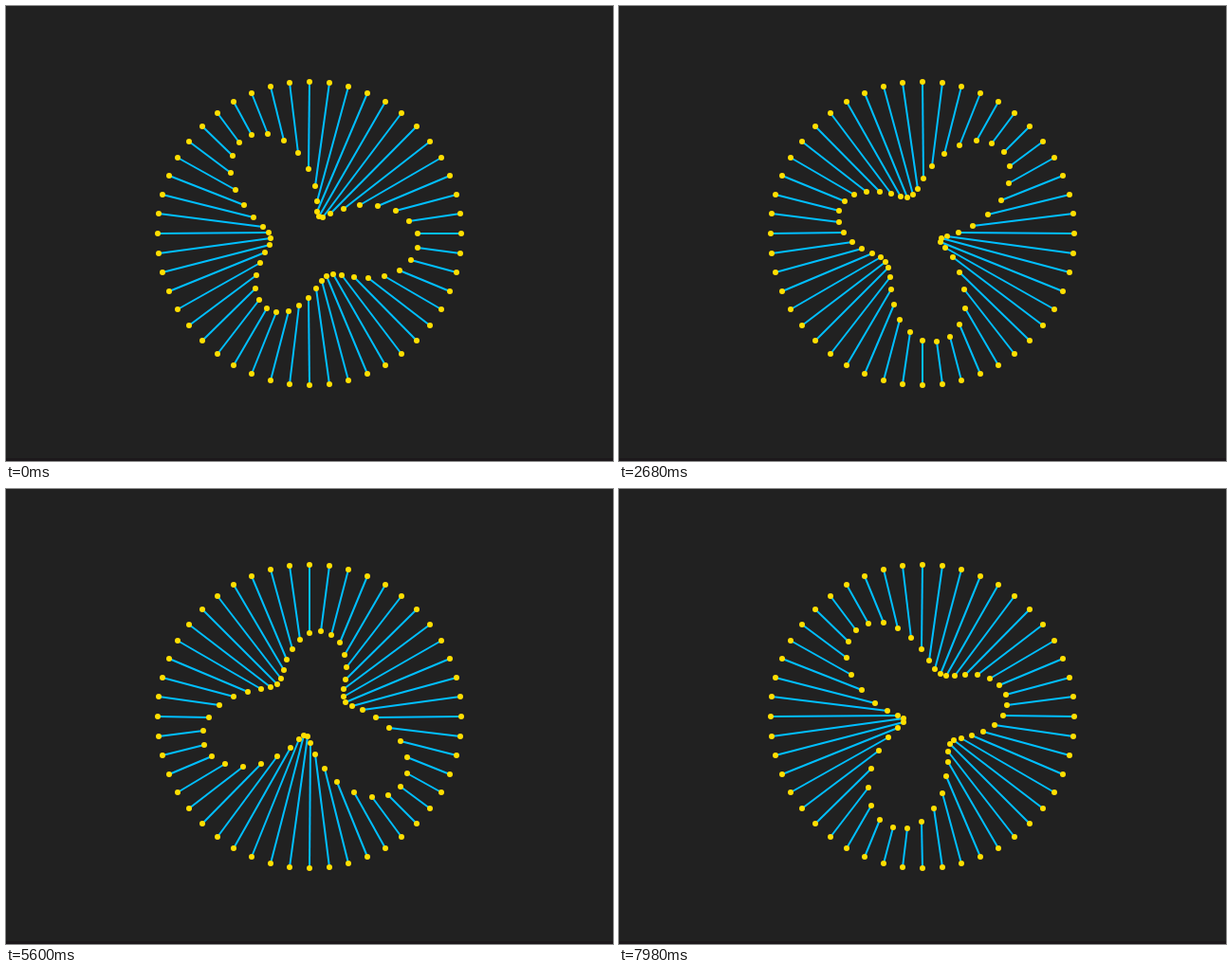
An HTML page with a canvas for the animation above (8000 ms loop, 640 px wide and 480 px high).

```html
<!DOCTYPE html>
<html lang="en">
<head>
<meta charset="utf-8">
<title>Rays on a turning shape</title>
<style>
  html, body { margin: 0; width: 100%; height: 100%; overflow: hidden; background: #212121; }
  canvas { display: block; }
</style>
</head>
<body>
<canvas id="stage" width="640" height="480"></canvas>
<script>
const ctx = document.getElementById('stage').getContext('2d');
const LOOP = 8000, STEP = 20, RAYS = 48;
const CX = 320, CY = 240, RING = 160;
const SPIN = 0.5; // radians per second

// Closed curve in polar form, with its slope
const lobes = [
  { n: 3, size: 35.4, phase: Math.PI },
  { n: 2, size: 18, phase: Math.PI + 0.295 },
];
const radius = a => lobes.reduce((r, l) => r + l.size * Math.sin(l.n * a + l.phase), 73);
const slope = a => lobes.reduce((s, l) => s + l.n * l.size * Math.cos(l.n * a + l.phase), 0);

// Angles run clockwise from the top; side is a shift across the ray
function place(angle, r, side = 0) {
  const s = Math.sin(angle), c = Math.cos(angle);
  return [Math.round(CX + r * s + side * c), Math.round(CY - r * c + side * s)];
}

function dot([x, y]) {
  ctx.beginPath();
  ctx.arc(x, y, 3, 0, 2 * Math.PI);
  ctx.fill();
}

function draw(ms) {
  const turn = SPIN * ms / 1000;
  ctx.fillStyle = '#212121';
  ctx.fillRect(0, 0, 640, 480);
  ctx.fillStyle = '#1c181b';
  ctx.fillRect(0, 477, 640, 3);

  ctx.strokeStyle = '#00bfff';
  ctx.lineWidth = 2;
  ctx.fillStyle = '#ffdf00';
  for (let i = 0; i < RAYS; i++) {
    const angle = i * 2 * Math.PI / RAYS;
    const r = radius(angle - turn), s = slope(angle - turn);
    const outer = place(angle, RING);
    const inner = place(angle, r, s / Math.hypot(r, s));
    ctx.beginPath();
    ctx.moveTo(...outer);
    ctx.lineTo(...inner);
    ctx.stroke();
    dot(outer);
    dot(inner);
  }
}

const start = performance.now();
function frame() {
  const ms = (performance.now() - start) % LOOP;
  draw(Math.floor(ms / STEP) * STEP);
  requestAnimationFrame(frame);
}
frame();
</script>
</body>
</html>
```
